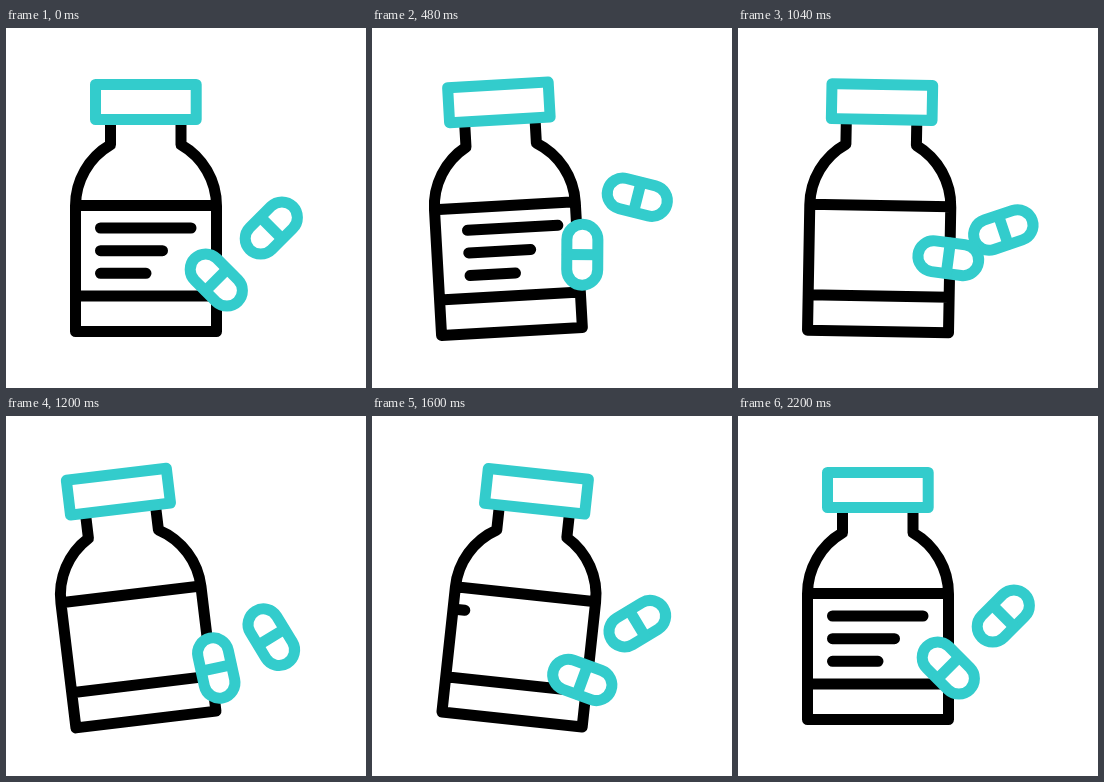
These frames come from a looping animation (360 by 360 pixels, 2.24 s). An HTML page:

```html
<!DOCTYPE html>
<html lang="en">
<head>
<meta charset="utf-8">
<title>Medicine bottle and pills</title>
<style>
  html, body { margin: 0; width: 100%; height: 100%; overflow: hidden; background: #fff; }
  svg { display: block; width: 100vw; height: 100vh; }
  .ink, .teal { fill: none; stroke-width: 11; stroke-linecap: round; stroke-linejoin: round; }
  .ink { stroke: #000; }
  .teal { stroke: #33cccc; fill: #fff; }
</style>
</head>
<body>
<svg viewBox="0 0 360 360">
  <defs>
    <clipPath id="label"><rect x="69.5" y="178" width="141" height="90"/></clipPath>
    <path id="text" class="ink" d="M94.5 200H185M94.5 222.7H156.5M94.5 245.3H140"/>
    <g id="pill" class="teal">
      <rect x="-30.5" y="-15.5" width="61" height="31" rx="15.5"/>
      <path d="M0-15V15"/>
    </g>
  </defs>
  <g id="bottle">
    <g clip-path="url(#label)">
      <g id="lines">
        <use href="#text"/>
        <use href="#text" x="-280"/>
      </g>
    </g>
    <path class="ink" d="M104.5 92V116.8A70.5 70.5 0 0 0 69.5 178V303.5H210.5V178A70.5 70.5 0 0 0 175 116.8V92M69.5 177.5H210.5M69.5 268H210.5"/>
    <rect class="teal" x="89.5" y="56.5" width="100.7" height="35"/>
  </g>
  <use id="upper" href="#pill"/>
  <use id="lower" href="#pill"/>
</svg>
<script>
const LOOP = 2240, STEP = 40;

function place(id, transform) {
  document.getElementById(id).setAttribute("transform", transform);
}

function draw(now) {
  const time = Math.floor(now % LOOP / STEP) * STEP;

  // Smooth progress from 0 to 1 between two times in ms.
  const ease = (from, to) => {
    const p = Math.min(1, Math.max(0, (time - from) / (to - from)));
    return p * p * (3 - 2 * p);
  };

  // The bottle rocks on the middle of its base.
  const tilt = -5 * ease(0, 400) + 17 * ease(400, 800) - 19.3 * ease(800, 1240)
    + 15.3 * ease(1240, 1700) - 8 * ease(1700, 2200);
  place("bottle", `rotate(${tilt} 140 304)`);

  // The text leaves on the right while its copy waits to enter on the left.
  place("lines", `translate(${140 * (ease(400, 1000) + ease(1400, 2000))} 0)`);

  // Each pill is tossed up, spins once as it falls, and settles.
  const upperY = 200 - 36.5 * ease(0, 640) + 66 * ease(640, 1360) - 29.5 * ease(1360, 1720);
  const upperTurn = -45 + 66 * ease(0, 600) - 382 * ease(600, 1400) - 44 * ease(1400, 1720);
  place("upper", `translate(265.3 ${upperY}) rotate(${upperTurn})`);

  const lowerY = 252 - 36 * ease(0, 750) + 51.5 * ease(850, 1400) - 15.5 * ease(1400, 2040);
  const lowerTurn = 45 + 48 * ease(0, 560) - 438 * ease(560, 1400) + 30 * ease(1400, 2160);
  place("lower", `translate(210.3 ${lowerY}) rotate(${lowerTurn})`);
}

let start;
function tick(now) {
  start ??= now;
  draw(now - start);
  requestAnimationFrame(tick);
}
draw(0);
requestAnimationFrame(tick);
</script>
</body>
</html>
```
